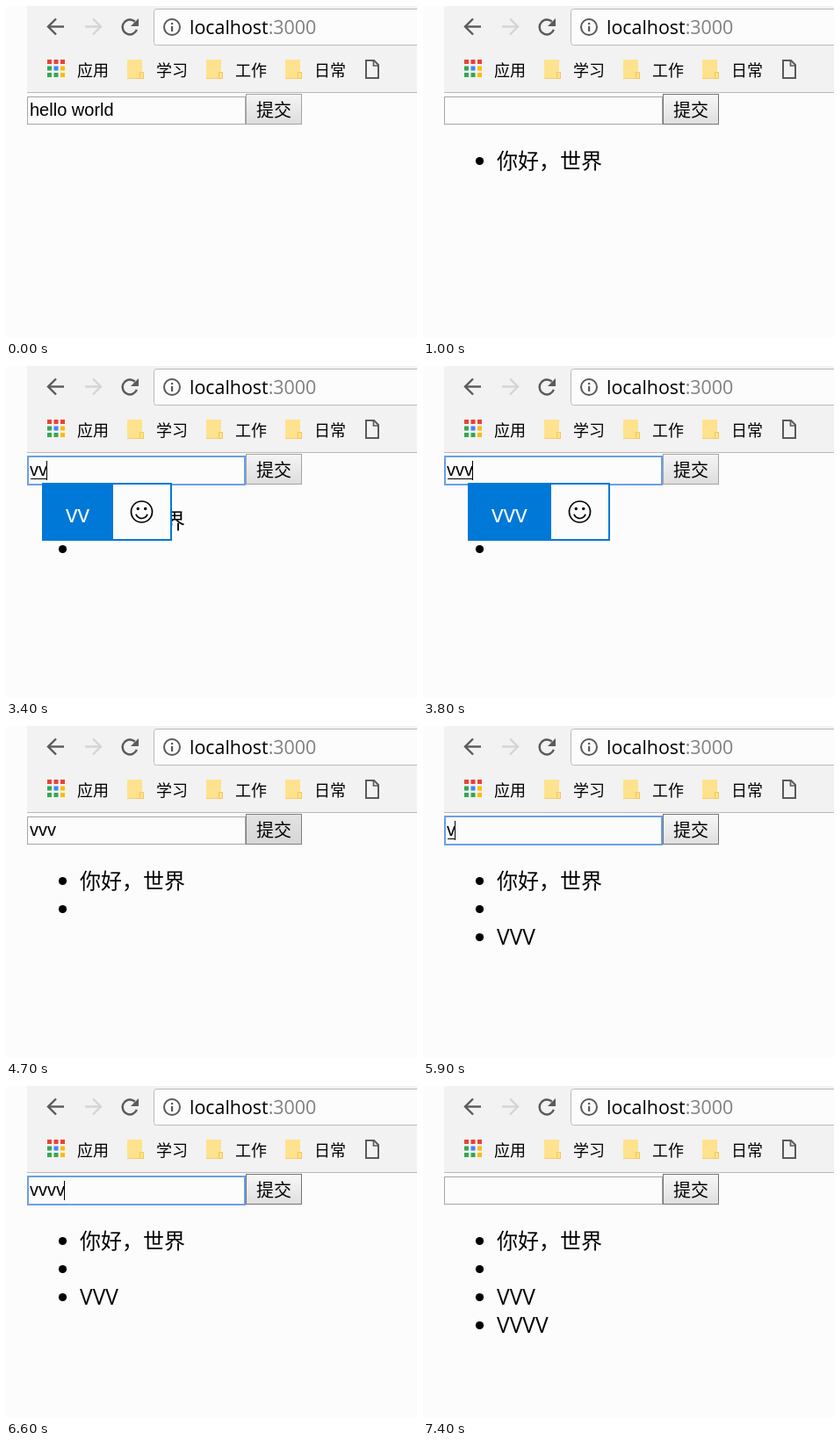
Recreate the animation shown at these times as an HTML page with a canvas. Size 468 px wide and 378 px high, loop 8 s.

```html
<!DOCTYPE html>
<html lang="zh">
<head>
<meta charset="utf-8">
<style>
html, body { margin: 0; width: 100%; height: 100%; overflow: hidden; background: #fcfcfc; }
canvas { display: block; }
</style>
</head>
<body>
<canvas id="stage" width="468" height="378"></canvas>
<script>
const ctx = document.getElementById('stage').getContext('2d');
const LOOP = 8000;
const PAPER = '#fcfcfc', BLUE = '#0078d7', ICON = '#5a5a5a';
const UI = '"Open Sans", "Noto Sans CJK SC", "Noto Sans CJK", sans-serif';
const CJK = '"Noto Sans CJK SC", "Noto Sans CJK", sans-serif';
const ARIAL = '"Liberation Sans", Arial, sans-serif';

// Each step changes only the listed parts of the state.
const start = { value: 'hello world', items: [], button: 'normal', focus: false, caret: false, composing: false, popup: 0 };
const hello = '你好，世界';
const steps = [
  [400, { button: 'hover' }],
  [800, { value: '', items: ['hello world'] }],
  [1000, { items: [hello] }],
  [1500, { button: 'pressed' }],
  [1600, { button: 'hover', items: [hello, ''] }],
  [2300, { button: 'normal' }],
  [2600, { focus: true, caret: true }],
  [3100, { caret: false }],
  [3300, { value: 'v', caret: true, composing: true }],
  [3400, { value: 'vv', popup: 2 }],
  [3700, { value: 'vvv' }],
  [3800, { popup: 3 }],
  [4100, { composing: false, popup: 0 }],
  [4400, { button: 'hover' }],
  [4600, { focus: false, caret: false }],
  [4700, { button: 'pressed' }],
  [4900, { button: 'hover', value: '', items: [hello, '', 'vvv'] }],
  [5000, { items: [hello, '', 'VVV'] }],
  [5200, { button: 'normal' }],
  [5500, { focus: true, caret: true }],
  [5900, { value: 'v', composing: true, button: 'hover' }],
  [6000, { value: 'vv', popup: 2 }],
  [6100, { value: 'vvv', popup: 3 }],
  [6200, { value: 'vvvv', popup: 4 }],
  [6600, { composing: false, popup: 0 }],
  [7100, { focus: false, caret: false, button: 'pressed' }],
  [7200, { button: 'hover', value: '', items: [hello, '', 'VVV', 'vvvv'] }],
  [7400, { items: [hello, '', 'VVV', 'VVVV'] }]
];

function stateAt(time) {
  return Object.assign({}, start, ...steps.filter(s => s[0] <= time).map(s => s[1]));
}

function rect(x, y, w, h, color) {
  ctx.fillStyle = color;
  ctx.fillRect(x, y, w, h);
}

function text(str, x, y, size, family, color = '#000') {
  ctx.font = `${size}px ${family}`;
  ctx.fillStyle = color;
  ctx.fillText(str, x, y);
}

function line(points, color, width, closed) {
  ctx.beginPath();
  points.forEach(([x, y]) => ctx.lineTo(x, y));
  if (closed) ctx.closePath();
  ctx.strokeStyle = color;
  ctx.lineWidth = width;
  ctx.stroke();
}

function arc(x, y, r, from, to, color, width) {
  ctx.beginPath();
  ctx.arc(x, y, r, from, to);
  ctx.strokeStyle = color;
  ctx.lineWidth = width;
  ctx.stroke();
}

function dot(x, y, r, color) {
  ctx.beginPath();
  ctx.arc(x, y, r, 0, 2 * Math.PI);
  ctx.fillStyle = color;
  ctx.fill();
}

function arrow(x, y, dir, color) {
  line([[x - 9 * dir, y], [x + 9 * dir, y]], color, 2.4);
  line([[x, y - 9], [x - 9 * dir, y], [x, y + 9]], color, 2.4);
}

function reload(x, y) {
  arc(x, y, 8.4, 0.35, 5.45, ICON, 2.5);
  ctx.beginPath();
  ctx.moveTo(x + 10, y - 10);
  ctx.lineTo(x + 10, y - 1);
  ctx.lineTo(x + 1, y - 1);
  ctx.fillStyle = ICON;
  ctx.fill();
}

function folder(x) {
  rect(x, 61, 17, 21, '#ffe28d');
  rect(x + 14, 75, 5, 8, '#f2c95c');
  rect(x + 15, 76, 3, 6, '#ffe28d');
  rect(x, 82, 15, 1, '#f2cf70');
}

function toolbar() {
  rect(24, 0, 444, 98, '#f2f2f2');
  rect(24, 98, 444, 1, '#b8b8b8');
  arrow(57, 23.5, 1, ICON);
  arrow(99, 23.5, -1, '#d5d5d5');
  reload(141, 24);

  ctx.beginPath();
  ctx.roundRect(168.5, 3.5, 320, 41, 3);
  ctx.fillStyle = PAPER;
  ctx.fill();
  ctx.strokeStyle = '#b9b9b9';
  ctx.lineWidth = 1;
  ctx.stroke();
  arc(189, 24, 9, 0, 2 * Math.PI, ICON, 2);
  rect(188, 19, 2.2, 2.2, ICON);
  rect(188, 23, 2.2, 6, ICON);
  text('localhost', 209, 32, 21.4, UI);
  const hostWidth = ctx.measureText('localhost').width;
  text(':3000', 209 + hostWidth, 32, 21.4, UI, '#808080');

  const [red, green, blue, yellow] = ['#ea4335', '#34a853', '#4285f4', '#fbbc05'];
  [red, red, red, green, blue, yellow, green, green, yellow].forEach((color, i) =>
    rect(47 + (i % 3) * 7.5, 61 + Math.floor(i / 3) * 7.5, 5, 5, color));
  ['应用', '学习', '工作', '日常'].forEach((label, i) => {
    if (i) folder(48 + 90 * i);
    text(label, 81 + 90 * i, 80, 18, CJK);
  });
  line([[410, 62], [419, 62], [424, 67], [424, 82], [410, 82]], ICON, 2, true);
  line([[418.5, 62], [418.5, 68], [424, 68]], ICON, 1.7);
}

function inputBox(s) {
  rect(24, 103, 249, 32, PAPER);
  ctx.strokeStyle = s.focus ? '#6b9fea' : '#a6a6a6';
  ctx.lineWidth = s.focus ? 2 : 1;
  if (s.focus) ctx.strokeRect(25, 103, 247, 32);
  else ctx.strokeRect(24.5, 103.5, 248, 31);
  text(s.value, 27, 125, 20, ARIAL);
  const width = ctx.measureText(s.value).width;
  if (s.composing) rect(28, 128, width - 1, 1, '#000');
  if (s.caret) rect(Math.max(27, Math.round(26 + width)), 108, 1, 22, '#000');
}

const buttonLooks = {
  normal: ['#f5f5f5', '#dddddd', '#a3a3a3'],
  hover: ['#f8f8f8', '#dfdfdf', '#747474'],
  pressed: ['#e3e3e3', '#d6d6d6', '#808080']
};

function button(mode) {
  const [top, bottom, edge] = buttonLooks[mode];
  const fill = ctx.createLinearGradient(0, 100, 0, 135);
  fill.addColorStop(0, top);
  fill.addColorStop(1, bottom);
  rect(273, 100, 64, 35, fill);
  ctx.strokeStyle = edge;
  ctx.lineWidth = 1;
  ctx.strokeRect(273.5, 100.5, 63, 34);
  text('提交', 285, 125.5, 20, CJK);
}

function list(items) {
  items.forEach((item, i) => {
    const y = 185 + 32 * i;
    dot(64.5, y - 8.5, 4.6, '#000');
    const size = item === hello ? 24 : /[A-Z]/.test(item) ? 24.6 : 22.5;
    text(item, 84, y, size, item === hello ? CJK : UI);
  });
}

function popup(count) {
  const x = 21 + 10 * count;
  const split = Math.round(54 + 13.5 * count);
  const width = split + 67;
  rect(x, 133, width, 66, BLUE);
  rect(x + split, 135, width - split - 2, 62, PAPER);
  text('v'.repeat(count), x + 27, 178, 27, UI, '#fff');
  const cx = x + split + 32.5, cy = 166;
  arc(cx, cy, 12, 0, 2 * Math.PI, '#000', 1.7);
  arc(cx, cy + 0.5, 7, 0.35, Math.PI - 0.35, '#000', 1.7);
  dot(cx - 4.2, cy - 3.5, 1.7, '#000');
  dot(cx + 4.2, cy - 3.5, 1.7, '#000');
}

function draw() {
  const s = stateAt(performance.now() % LOOP);
  rect(0, 0, 468, 378, PAPER);
  toolbar();
  inputBox(s);
  button(s.button);
  list(s.items);
  if (s.popup) popup(s.popup);
  requestAnimationFrame(draw);
}
draw();
</script>
</body>
</html>
```
